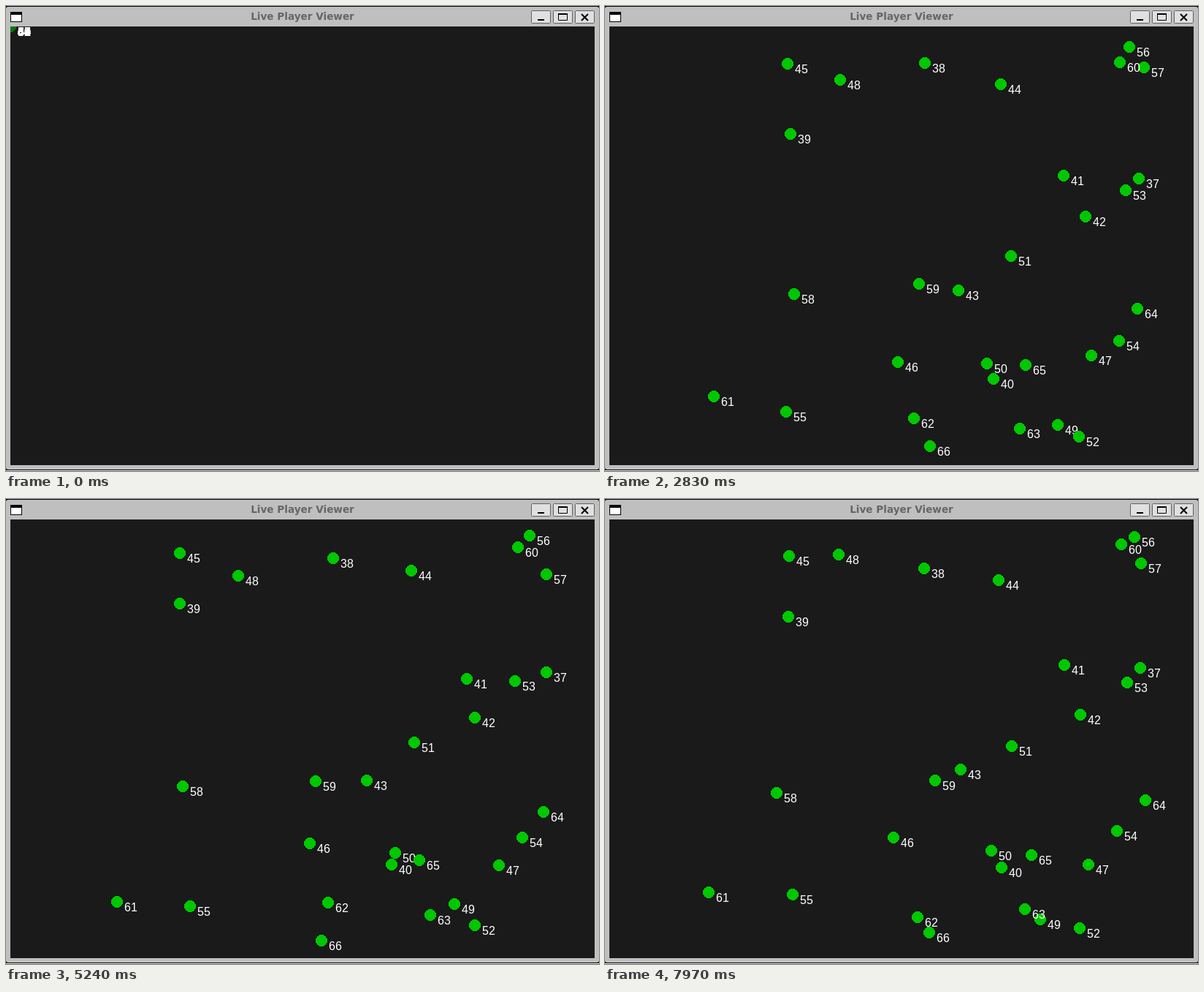
An HTML page for the animation above (8 s loop, 812 by 636 pixels).

```html
<!DOCTYPE html>
<html lang="en">
<head>
<meta charset="utf-8">
<title>Live Player Viewer</title>
<style>
  html, body { margin: 0; width: 100%; height: 100%; overflow: hidden; background: #000; }
  svg { display: block; }
  .title { font: bold 13.6px "DejaVu Sans", sans-serif; fill: #666; text-anchor: middle; }
  .button { fill: #e0e0e0; stroke: #606060; }
  .glyph { fill: none; stroke: #000; stroke-width: 2; }
  .dot { fill: #00c800; shape-rendering: crispEdges; }
  .idle .dot { fill: #007800; }
  .label { font: 16px "Liberation Sans", Arial, sans-serif; fill: #fff; }
</style>
</head>
<body>
<svg width="812" height="636" viewBox="0 0 812 636">
  <rect y="1" width="812" height="633" rx="3" fill="#bfbfbf"/>
  <path d="M0 635h812v1h-812z" fill="#eee"/>
  <path d="M6 8h16v14h-16z"/>
  <path d="M7 12h14v9h-14z" fill="#fff"/>
  <text class="title" x="406" y="19">Live Player Viewer</text>
  <g class="button">
    <rect x="719.5" y="6.5" width="26" height="17" rx="1"/>
    <rect x="749.5" y="6.5" width="26" height="17" rx="1"/>
    <rect x="779.5" y="6.5" width="26" height="17" rx="1"/>
  </g>
  <g class="glyph">
    <path d="M728 19h9"/>
    <path d="M756.5 11h12v8.5h-12z" stroke-width="1"/>
    <path d="M756 11h13"/>
    <path d="M788 11l9 9m0-9l-9 9"/>
  </g>
  <svg id="field" x="6" y="28" width="800" height="600" viewBox="6 28 800 600" overflow="hidden">
    <rect x="6" y="28" width="800" height="600" fill="#1a1a1a"/>
  </svg>
</svg>
<script>
const LOOP = 8000, WAKE = 220, TICK = 35;
const FIRST_ID = 37, CORNER = [6, 28];

// The spot each player roams around, in order of id
const homes = [
  [738, 232], [437, 84], [247, 168], [539, 501], [637, 237], [651, 289],
  [495, 376], [550, 109], [250, 84], [404, 474], [668, 499], [326, 94],
  [613, 568], [526, 483], [555, 337], [645, 585], [696, 249], [708, 460],
  [256, 549], [713, 57], [736, 92], [247, 390], [433, 383], [704, 72],
  [143, 538], [425, 561], [572, 573], [737, 413], [572, 486], [442, 596]
];

let seed = 37;
function random() {
  seed = (seed * 16807) % 2147483647;
  return seed / 2147483647;
}

// Random walk that is pulled back home
function walk() {
  let value = 0;
  return Array.from({ length: Math.ceil(LOOP / TICK) }, () =>
    value = value * 0.95 + (random() - 0.5) * 8);
}

const field = document.getElementById("field");

function add(parent, tag, attrs) {
  const node = document.createElementNS("http://www.w3.org/2000/svg", tag);
  for (const name in attrs) node.setAttribute(name, attrs[name]);
  return parent.appendChild(node);
}

const players = homes.map((home, i) => {
  const node = add(field, "g", {});
  add(node, "circle", { class: "dot", r: 8 });
  add(node, "text", { class: "label", x: 10, y: 13 }).textContent = FIRST_ID + i;
  return { node, home, walks: [walk(), walk()] };
});

function draw(time) {
  const idle = time < WAKE;
  const tick = Math.max(0, Math.floor((time - WAKE) / TICK));
  const arrived = idle ? 0 : 1 - 0.5 ** (tick + 1);

  field.classList.toggle("idle", idle);
  for (const { node, home, walks } of players) {
    const [x, y] = CORNER.map((origin, k) =>
      Math.round(origin + (home[k] + walks[k][tick] - origin) * arrived));
    node.setAttribute("transform", `translate(${x} ${y})`);
  }
}

const began = performance.now();
function frame() {
  draw((performance.now() - began) % LOOP);
  requestAnimationFrame(frame);
}
frame();
</script>
</body>
</html>
```
